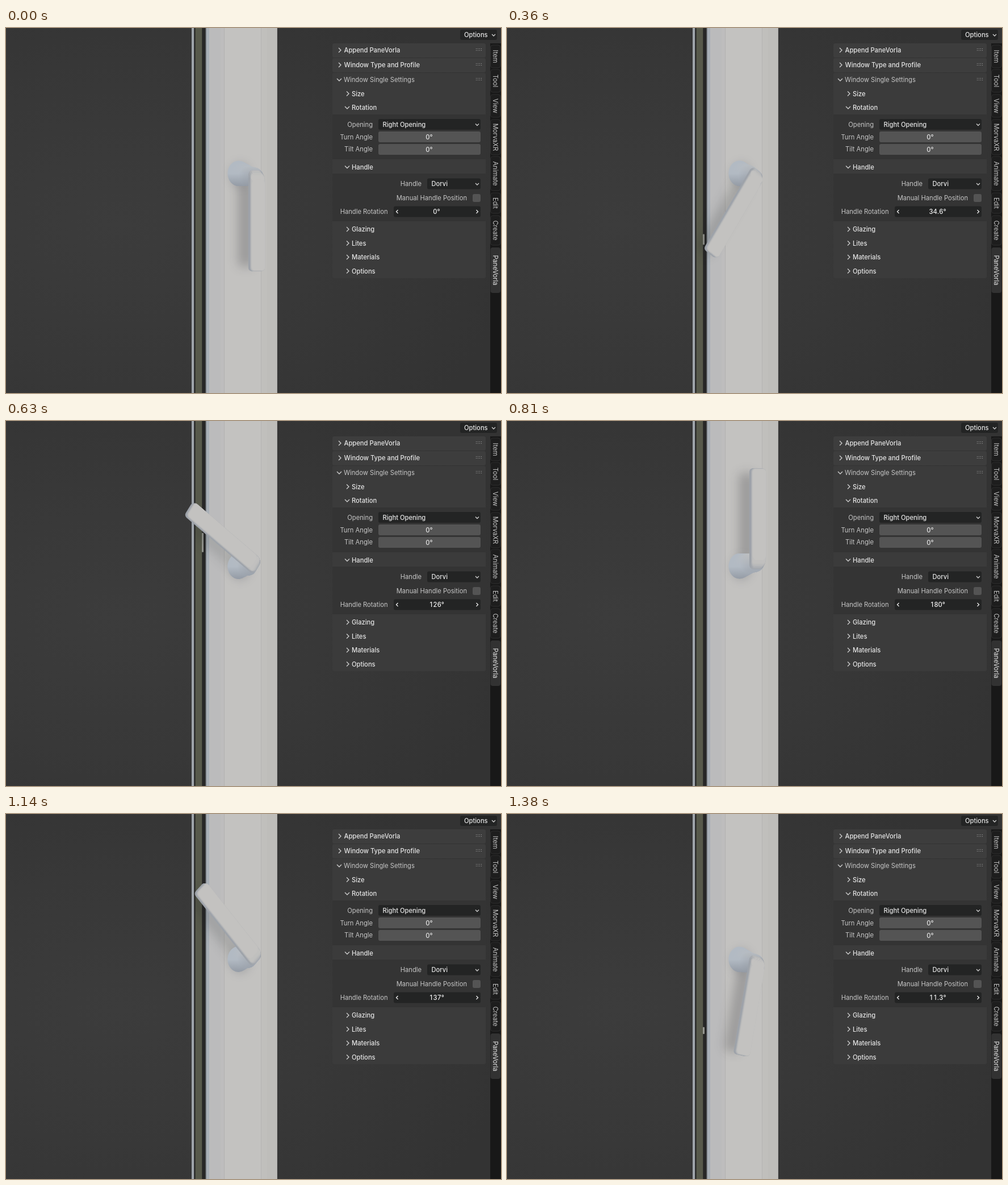
These frames come from a looping animation (872 by 642 pixels, 1410 ms). An HTML page with a canvas:

```html
<!DOCTYPE html>
<html lang="en">
<head>
<meta charset="utf-8">
<title>Handle rotation</title>
<style>
html, body { margin: 0; width: 872px; height: 642px; overflow: hidden; background: #393939; }
canvas { display: block; }
</style>
</head>
<body>
<canvas id="stage" width="872" height="642"></canvas>
<script>
const ctx = document.getElementById('stage').getContext('2d');
const LOOP = 1410, STEP = 30;
const FONT = '11.2px Inter, "Open Sans", sans-serif';
const BRIGHT = '#e6e6e6', DIM = '#c6c6c6', DARK = '#232424', FIELD = '#545454', HEAD = '#3d3d3d', BODY = '#343434';

// time, angle, slope
const keys = [
  [0, 0, 0.005], [210, 7.14, 0.08], [480, 71.8, 0.34], [630, 126, 0.35], [810, 180, 0.2],
  [810, 180, 0], [960, 180, 0], [1140, 137, -0.44], [1380, 11.3, -0.42], [1410, 0, -0.3]
];

function angleAt(t) {
  const i = keys.findIndex(k => t < k[0]);
  const [t0, a, ma] = keys[i - 1], [t1, b, mb] = keys[i];
  const h = t1 - t0, s = (t - t0) / h, s2 = s * s, s3 = s2 * s;
  return a * (2 * s3 - 3 * s2 + 1) + ma * h * (s3 - 2 * s2 + s) +
    b * (3 * s2 - 2 * s3) + mb * h * (s3 - s2);
}

const clamp = (x, lo = 0, hi = 1) => Math.min(hi, Math.max(lo, x));
const lerp = (a, b, s) => a + (b - a) * s;
const blend = (a, b, s) => a.map((v, i) => lerp(v, b[i], s));
const rgb = c => `rgb(${c.map(Math.round)})`;

function rect(x0, y0, x1, y1, color) {
  ctx.fillStyle = color;
  ctx.fillRect(x0, y0, x1 - x0, y1 - y0);
}

function box(x0, y0, x1, y1, color, r = 3) {
  ctx.fillStyle = color;
  ctx.beginPath();
  ctx.roundRect(x0, y0, x1 - x0, y1 - y0, r);
  ctx.fill();
}

function text(str, x, y, color = BRIGHT, align = 'left', weight = 500) {
  ctx.font = weight + ' ' + FONT;
  ctx.fillStyle = color;
  ctx.textAlign = align;
  ctx.fillText(str, x, y + 4);
}

// Centred number with digits of equal advance
function number(str, x, y, color = BRIGHT) {
  ctx.font = '500 ' + FONT;
  const chars = [...str];
  const widths = chars.map(c => ctx.measureText(/\d/.test(c) ? '0' : c).width);
  let left = x - widths.reduce((a, b) => a + b, 0) / 2;
  chars.forEach((c, i) => {
    text(c, left + widths[i] / 2, y, color, 'center');
    left += widths[i];
  });
}

function chevron(x, y, dir, size = 4, color = '#cfcfcf') {
  ctx.save();
  ctx.translate(x, y);
  ctx.rotate(dir * Math.PI / 2);
  ctx.strokeStyle = color;
  ctx.lineWidth = 1.3;
  ctx.beginPath();
  ctx.moveTo(-size / 2, -size);
  ctx.lineTo(size / 2, 0);
  ctx.lineTo(-size / 2, size);
  ctx.stroke();
  ctx.restore();
}

function backdrop() {
  ctx.save();
  ctx.translate(200, 345);
  ctx.scale(1.5, 1);
  const g = ctx.createRadialGradient(0, 0, 0, 0, 0, 480);
  g.addColorStop(0, '#3c3c3c');
  g.addColorStop(0.5, '#383838');
  g.addColorStop(1, '#333333');
  ctx.fillStyle = g;
  ctx.fillRect(-200, -345, 700, 642);
  ctx.restore();
}

function frame() {
  const bands = [
    [327, 331.5, '#9ea4aa'], [331.5, 333.5, '#202020'], [333.5, 345.5, '#57594b'], [345.5, 351.5, '#262626'],
    [351.5, 353, '#767c82'], [353, 358, '#a8afb6'], [358, 378, '#bbbbbc'], [378, 384, '#bebdbd'],
    [384, 385, '#b2b1b0'], [385, 449, '#c3c2c0'], [449, 450, '#b6b5b3'], [450, 460, '#c0bfbc'],
    [460, 477, '#bebdba'], [477, 478, '#a9a8a6']
  ];
  rect(327, 0, 478, 642, '#262626');
  for (const [a, b, c] of bands) rect(a, 0, b, 642, c);
}

const PX = 444.5, PY = 255.5, SQUASH = 0.85, BAR = 172, DEPTH = 35, BEND = 16, THICK = 5;
const LIGHT = [195, 194, 192], BLUE = [178, 186, 195], SIDE = [158, 163, 170], LOW = [146, 153, 163];

function slab(rad, depth, half, from, to, radius, fill, dy = 0) {
  const c = Math.cos(rad), s = Math.sin(rad);
  ctx.save();
  ctx.transform(SQUASH * c, s, -SQUASH * s, c, PX - depth, PY + dy);
  ctx.beginPath();
  ctx.roundRect(-half, from, half * 2, to - from, radius);
  ctx.restore();
  ctx.fillStyle = fill;
  ctx.fill();
}

function shade(rad) {
  ctx.save();
  ctx.beginPath();
  ctx.rect(333, 0, 145, 642);
  ctx.clip();
  ctx.filter = 'blur(9px)';
  const a = 0.07 + 0.17 * Math.cos(rad) ** 2;
  slab(rad, 22, 16, 10, BAR - 8, 8, `rgba(30,32,36,${a})`, 8 * Math.sin(rad));
  ctx.filter = 'blur(7px)';
  slab(rad, DEPTH - 3, 23, -23, 23, 23, 'rgba(80,85,95,0.2)', 3);
  ctx.restore();
}

// Light caught in the dark groove beside the pane
function glint(deg, rad) {
  if (deg < 8 || deg > 132) return;
  const c = Math.cos(rad);
  const y = PY - 42 + 130 * (c + 0.59) - 35 * (c + 0.59) * (c - 0.31);
  const h = lerp(6, 17, clamp((deg - 10) / 80));
  box(345, y - h, 348, y + h, '#94958f', 1);
}

// Lit from above: pale on top, grey underneath
function neckFill(d) {
  const s = clamp(d / 30);
  const g = ctx.createLinearGradient(0, PY - 23, 0, PY + 24);
  g.addColorStop(0, rgb(blend(LIGHT, BLUE, s)));
  g.addColorStop(0.5, rgb(blend(SIDE, BLUE, clamp(0.4 + s))));
  g.addColorStop(1, rgb(LOW));
  return g;
}

// Handle built from thin slices, from the wall to the front face
function handle(rad) {
  const under = blend(LIGHT, LOW, (1 - Math.cos(rad)) / 2);
  for (let d = DEPTH; d >= 0; d -= 0.5) {
    const back = clamp((d - THICK) / (DEPTH - THICK));
    const rim = d < 1 ? 1 - d : 0;
    const half = lerp(14.8, 22.5, Math.sqrt(back)) - rim;
    const bend = 1 - Math.min(d / BEND, 1);
    const out = d < BEND
      ? 11 - 22 * (1 - Math.sqrt(1 - bend * bend))
      : lerp(11, 22, (d - BEND) / (DEPTH - BEND));
    if (d > THICK) {
      slab(rad, d, half, -out, 22.5, lerp(8, 22.5, clamp(back * 1.4)), neckFill(d));
    } else {
      slab(rad, d, half, -out, BAR - rim, [8, 8, 6, 6], rgb(blend(LIGHT, SIDE, clamp(d / 2.5))));
      if (d > 0) slab(rad, d, half - 1, -out, 14, 8, rgb(blend(LIGHT, under, d / 8)));
    }
  }
}

function grip(y) {
  for (let i = 0; i < 8; i++) {
    const x = 828 + (i % 4) * 3, yy = y - 3 + (i >> 2) * 3;
    rect(x, yy, x + 1, yy + 1, '#a8a8a8');
  }
}

function panel(value) {
  box(575, 27, 845, 52, HEAD);
  box(575, 53, 845, 78, HEAD);
  box(575, 79, 845, 440, '#3b3b3b');
  rect(575, 152, 845, 231, BODY);
  rect(575, 256, 845, 340, BODY);
  [39, 65, 91].forEach(grip);

  chevron(588, 39, 0);
  text('Append PaneVorla', 595.5, 39);
  chevron(588, 65, 0);
  text('Window Type and Profile', 595.5, 65);
  chevron(587, 91, 1);
  text('Window Single Settings', 595, 91, DIM, 'left', 400);

  const subs = [['Size', 115.5, 0], ['Rotation', 140, 1], ['Handle', 244.5, 1],
    ['Glazing', 354, 0], ['Lites', 378.5, 0], ['Materials', 403, 0], ['Options', 427.5, 0]];
  for (const [name, y, open] of subs) {
    chevron(open ? 601 : 602, y, open);
    text(name, 609, y);
  }

  const labels = [['Opening', 646, 169.5], ['Turn Angle', 646, 191.5], ['Tilt Angle', 646, 213],
    ['Handle', 732, 274], ['Manual Handle Position', 812, 298.5], ['Handle Rotation', 672.5, 323]];
  for (const [name, x, y] of labels) text(name, x, y, DIM, 'right', 400);

  box(656, 160, 836, 179, DARK);
  text('Right Opening', 663.5, 169.5);
  chevron(830, 170, 1, 3);
  for (const y of [191.5, 213.5]) {
    box(656, y - 9.5, 836, y + 9.5, FIELD);
    number('0°', 745.5, y);
  }
  box(742, 264.5, 836, 283.5, DARK);
  text('Dorvi', 749.5, 274);
  chevron(830, 274.5, 1, 3);
  box(822, 292, 836, 306, FIELD);

  box(683, 313.5, 836, 332.5, DARK);
  chevron(689, 323, 2, 3, '#eeeeee');
  chevron(830, 323, 0, 3, '#eeeeee');
  number(Number(value.toPrecision(3)) + '°', 758.5, 323, '#f2f2f2');
}

function tabs() {
  rect(853, 27, 872, 642, '#181818');
  const list = [['Item', 30, 70], ['Tool', 73, 113], ['View', 117, 157], ['MorvaXR', 161, 223],
    ['Animate', 226, 286], ['Edit', 290, 326], ['Create', 330, 382], ['PaneVorla', 386, 466]];
  list.forEach(([name, y0, y1], i) => {
    const active = i === list.length - 1;
    box(853.5, y0, 871, y1, active ? '#323232' : '#1d1d1d', 4);
    if (!active) {
      ctx.strokeStyle = '#2e2e2e';
      ctx.lineWidth = 1;
      ctx.stroke();
    }
    ctx.save();
    ctx.translate(861.5, (y0 + y1) / 2);
    ctx.rotate(Math.PI / 2);
    text(name, 0, 0, active ? BRIGHT : DIM, 'center', 400);
    ctx.restore();
  });
  box(800, 3, 865, 21, DARK);
  text('Options', 807, 12);
  chevron(859, 12.5, 1, 3);
}

function draw(t) {
  const deg = angleAt(t), rad = deg * Math.PI / 180;
  backdrop();
  frame();
  glint(deg, rad);
  shade(rad);
  handle(rad);
  panel(deg);
  tabs();
}

const start = performance.now();
function tick() {
  const t = (performance.now() - start) % LOOP;
  draw(Math.floor(t / STEP) * STEP);
  requestAnimationFrame(tick);
}
tick();
</script>
</body>
</html>
```
